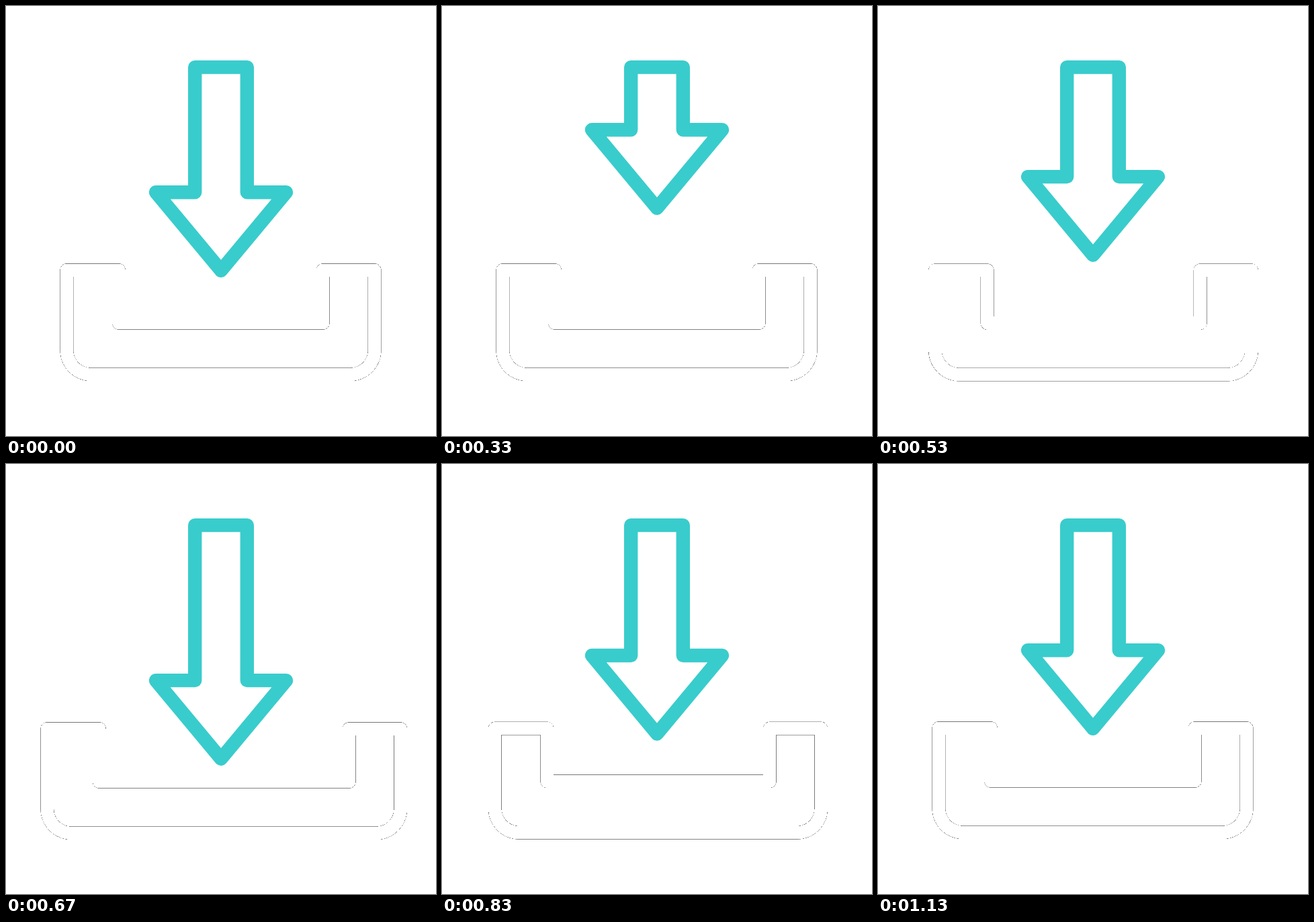
Animation of 640x640 px, one loop 1500 ms. Source, as an HTML page with a canvas:

```html
<!DOCTYPE html>
<html lang="en">
<head>
<meta charset="utf-8">
<title>Download</title>
<style>
  html, body { margin: 0; width: 100%; height: 100%; overflow: hidden; background: #fff; }
  canvas { display: block; width: 640px; height: 640px; }
</style>
</head>
<body>
<canvas id="stage" width="640" height="640"></canvas>
<script>
const ctx = document.getElementById('stage').getContext('2d');
const LOOP = 1500;
const TRAY_TOP = 375, TRAY_H = 195, TRAY_W = 20.28, RADIUS = 36, RIM_INK = 140;
const TRAY_KEYS = [[14, 0], [21, 1], [28, 0]];
const ARROW_KEYS = [[0, 0], [11, -95.2], [21, 49], [28, -19], [34, 0]];

// Symmetric cubic-bezier(s, 0, 1 - s, 1)
function ease(s, t) {
  let lo = 0, hi = 1;
  for (let i = 0; i < 30; i++) {
    const u = (lo + hi) / 2, v = 1 - u;
    const x = 3 * s * u * v * v + 3 * (1 - s) * u * u * v + u * u * u;
    if (x < t) lo = u; else hi = u;
  }
  return lo * lo * (3 - 2 * lo);
}

function track(keys, step, s) {
  if (step <= keys[0][0]) return keys[0][1];
  for (let i = 1; i < keys.length; i++) {
    const [t0, a] = keys[i - 1], [t1, b] = keys[i];
    if (step < t1) return a + (b - a) * ease(s, (step - t0) / (t1 - t0));
  }
  return keys[keys.length - 1][1];
}

// Thirty steps per second, on a 10 ms clock
function stepAt(ms) {
  const r = ms % 100;
  return Math.floor(ms / 100) * 3 + (r >= 70 ? 2 : r >= 30 ? 1 : 0);
}

// The tray is an invisible band: only its soft rim pixels show
function drawTray(step) {
  const slide = (base, reach, s) => base + reach * track(TRAY_KEYS, step, s);
  const left = slide(90.41, -30.4, 0.4), notchL = slide(167.94, -30.4, 0.4);
  const notchR = slide(471.69, 41.2, 0.35), right = slide(548.55, 40.55, 0.38);
  const dy = slide(0, 1.05, 0.38);
  const top = 393.16 + dy, notch = 471.76 + dy, bottom = 548.34 + dy;
  const bendY = bottom - RADIUS, bendL = left + RADIUS, bendR = right - RADIUS;
  const lines = [
    [left, top, notchL, top],
    [notchL, top, notchL, notch],
    [notchL, notch, notchR, notch],
    [notchR, top, notchR, notch],
    [notchR, top, right, top],
    [right, top, right, bendY],
    [bendL, bottom, bendR, bottom],
    [left, top, left, bendY]
  ];

  const img = ctx.createImageData(640, TRAY_H);
  const px = img.data;
  for (let j = 0, k = 0; j < TRAY_H; j++) {
    const y = TRAY_TOP + j + 0.5;
    for (let i = 0; i < 640; i++, k += 4) {
      const x = i + 0.5;
      let near = 1e6;
      for (const [x0, y0, x1, y1] of lines) {
        const dx = Math.max(x0 - x, 0, x - x1);
        const ey = Math.max(y0 - y, 0, y - y1);
        near = Math.min(near, dx * dx + ey * ey);
      }
      let dist = Math.sqrt(near);
      if (y > bendY && (x < bendL || x > bendR)) {
        const cx = x < bendL ? bendL : bendR;
        dist = Math.min(dist, Math.abs(Math.hypot(x - cx, y - bendY) - RADIUS));
      }
      const cover = TRAY_W / 2 + 0.5 - dist;
      const rim = cover >= 0.5 && cover < 0.999;
      px[k] = px[k + 1] = px[k + 2] = rim ? 255 - RIM_INK * cover : 255;
      px[k + 3] = 255;
    }
  }
  ctx.putImageData(img, 0, TRAY_TOP);
}

function drawArrow(step) {
  const y = 277.2 + track(ARROW_KEYS, step, 1 / 3);
  const points = [
    [281.2, 91.1], [358.8, 91.1], [358.8, y], [417, y],
    [320, y + 116.6], [223, y], [281.2, y]
  ];
  ctx.beginPath();
  for (const [px, py] of points) ctx.lineTo(px, py);
  ctx.closePath();
  ctx.lineWidth = 20.4;
  ctx.lineJoin = 'round';
  ctx.strokeStyle = '#39cccc';
  ctx.stroke();
}

let shown = -1;
function tick() {
  const step = stepAt(performance.now() % LOOP);
  if (step !== shown) {
    shown = step;
    ctx.fillStyle = '#fff';
    ctx.fillRect(0, 0, 640, 640);
    drawTray(step);
    drawArrow(step);
  }
  requestAnimationFrame(tick);
}
tick();
</script>
</body>
</html>
```
